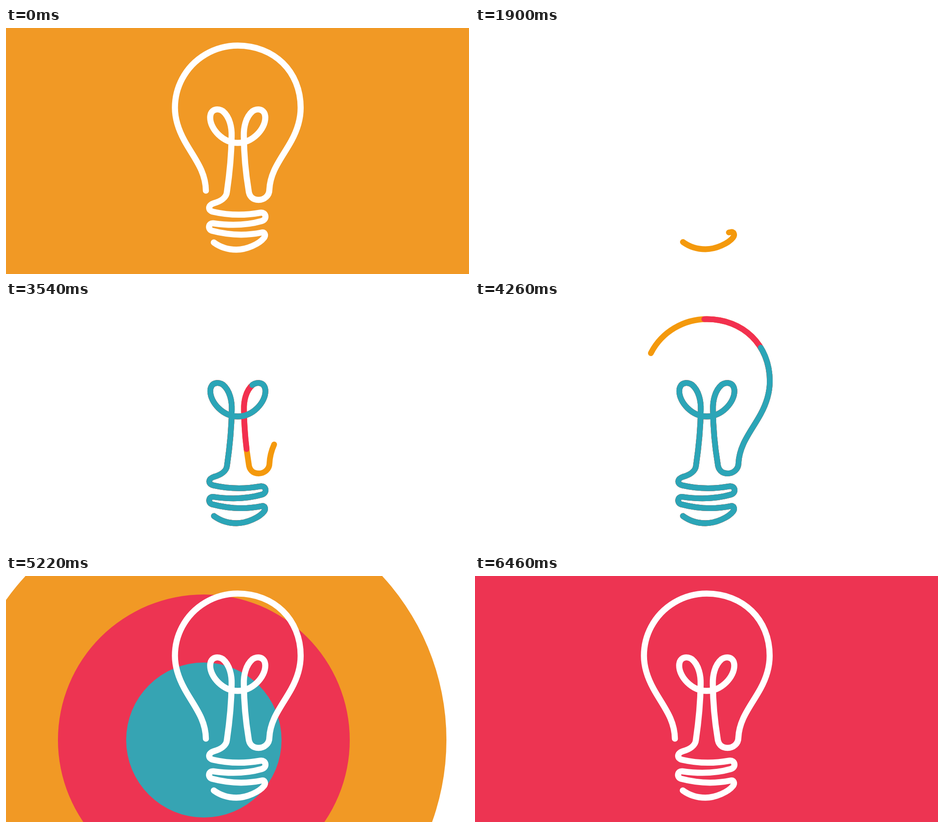
Animation, 1025 px wide and 546 px high, one loop 7260 ms. Source, as an HTML page with a canvas:

```html
<!DOCTYPE html>
<html lang="en">
<head>
<meta charset="utf-8">
<title>Light bulb</title>
<style>
html, body { margin: 0; width: 100%; height: 100%; overflow: hidden; background: #fff; }
canvas { display: block; }
</style>
</head>
<body>
<canvas id="stage" width="1025" height="546"></canvas>
<script>
const W = 1025, H = 546, LOOP = 7260, STEP = 40;
const ctx = document.getElementById('stage').getContext('2d');

const FILL = { orange: '#f19925', red: '#ed3452', teal: '#36a4b3' };
const LINE = ['#f4990c', '#f2304f', '#2ba5b7'];

// One continuous line, split at two points whose times are known.
const PARTS = [
  // screw base, left stem, start of the left loop
  `M460 476 C475 487 492 492 510 492 C533 492 561 479 571 466 C576 459 572 452 566 454
   C532 461 494 460 456 450 C446 447 448 432 459 433.5 C494 438.5 531 438.5 566 428.5
   C579 425 576 408 563 410 C530 416 494 416 459 408 C446 405 447 393 460 389
   C476 384.5 488 376 489 364 C494 330 499 287 499.5 240 C500 222 496 198 480 184.5`,
  // both loops, right stem, right side, dome
  `C471 178 452 178 452 199 C452 224 480 255 513 255 C546 255 574 224 574 199
   C574 178 555 178 546 184.5 C530 198 526 222 526.5 240 C527 287 532 330 537 360
   C538 373 546 381.5 559 381.5 C572 381.5 583 372 583 359 C585 316 612 287 632 250
   C644 228 652.3 205 652.3 177 C652.3 96 593 39 513 39 A139 138 0 0 0 390 112.7`,
  // left side
  `A139 138 0 0 0 374 177 C374 205 383 228 395 250 C415 287 442 316 442.5 361`
];
const outline = PARTS.join(' ');
const bulb = new Path2D(outline);

function pathLength(d) {
  const el = document.createElementNS('http://www.w3.org/2000/svg', 'path');
  el.setAttribute('d', d);
  return el.getTotalLength();
}
const lenA = pathLength(PARTS[0]);
const lenB = pathLength(PARTS[0] + PARTS[1]);
const total = pathLength(outline);

const DRAW = 1700, MARK_A = 2780, MARK_B = 4260, BURST = 4740, FULL = 5620;
const LINE_LAG = 147, RING_LAG = 140;

const snap = (t, from) => from + Math.floor((t - from) / STEP) * STEP;

function headAt(t) {
  if (t < MARK_A) return lenA * (t - DRAW) / (MARK_A - DRAW);
  return lenA + (lenB - lenA) * (t - MARK_A) / (MARK_B - MARK_A);
}

function ringRadius(age) {
  if (age <= 0) return 0;
  return age * (0.86 + 0.000643 * (age - 200) + 0.00000201 * (age - 200) * (age - 340));
}

function fillAll(color) {
  ctx.fillStyle = color;
  ctx.fillRect(0, 0, W, H);
}

function disc(x, y, r, color) {
  ctx.beginPath();
  ctx.arc(x, y, r, 0, Math.PI * 2);
  ctx.fillStyle = color;
  ctx.fill();
}

function whiteBulb() {
  ctx.strokeStyle = '#fff';
  ctx.lineWidth = 13.5;
  ctx.stroke(bulb);
}

function colorLine(t) {
  const head = headAt(t);
  ctx.save();
  ctx.translate(0.3, -1);
  ctx.lineWidth = 12.8;
  LINE.forEach((color, i) => {
    const len = Math.min(total, head - i * LINE_LAG);
    if (len <= 0) return;
    ctx.setLineDash(len < total ? [len, total * 2] : []);
    ctx.strokeStyle = color;
    ctx.stroke(bulb);
  });
  ctx.restore();
}

function burst(t) {
  const colors = [FILL.orange, FILL.red, FILL.teal];
  const radii = colors.map((c, i) => ringRadius(t - BURST - i * RING_LAG));
  if (radii[0] <= 0) return;
  colors.forEach((c, i) => { if (radii[i] > 0) disc(438, 364, radii[i], c); });
  ctx.save();
  ctx.beginPath();
  ctx.arc(438, 364, radii[0], 0, Math.PI * 2);
  ctx.clip();
  whiteBulb();
  ctx.restore();
}

function poster(color) {
  fillAll(color);
  whiteBulb();
}

function render(t) {
  ctx.lineCap = ctx.lineJoin = 'round';
  if (t < 800) return poster(FILL.orange);
  if (t >= 6460) return poster(FILL.red);
  if (t >= FULL) return poster(FILL.teal);

  fillAll('#fff');
  if (t < 1240) {
    const left = 1 - (snap(t, 800) - 760) / 480;
    disc(522, 245, 640 * left * left, '#ee9832');
    whiteBulb();
  } else if (t >= 1740) {
    const s = snap(t, 1740);
    colorLine(s);
    burst(s);
  }
}

const start = performance.now();
function frame() {
  render((performance.now() - start) % LOOP);
  requestAnimationFrame(frame);
}
frame();
</script>
</body>
</html>
```
